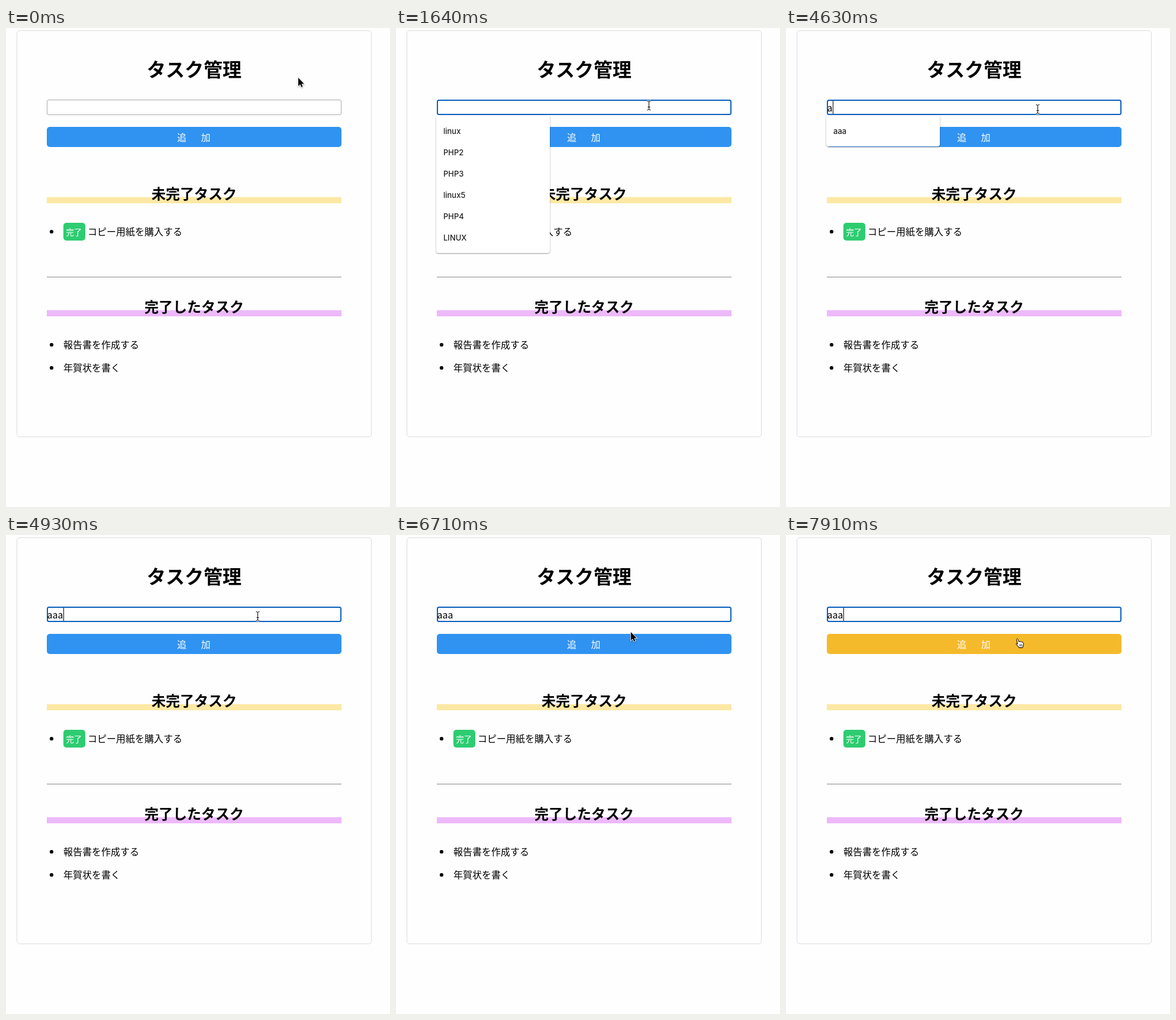
Write an HTML page that moves like this. It is 649 px wide and 809 px high and loops after 8000 ms.

```html
<!DOCTYPE html>
<html lang="ja">
<head>
<meta charset="utf-8">
<title>タスク管理</title>
<style>
  html, body { margin: 0; width: 100%; height: 100%; overflow: hidden; background: #fefefe; }
  svg { display: block; width: 649px; height: 809px; font: 16px "Noto Sans CJK JP", "Noto Sans CJK", sans-serif; }
  .title, .heading { font-weight: 700; text-anchor: middle; }
  .title { font-size: 32px; }
  .heading { font-size: 24px; }
  .done { font-size: 13.33px; }
  .light { fill: #fff; }
  .option { font: 500 13px Inter, sans-serif; fill: #222; }
  #panel { filter: drop-shadow(0 1px 1.2px rgba(0, 0, 0, .4)); }
</style>
</head>
<body>
<svg viewBox="0 0 649 809">
  <rect x="18.5" y="4.5" width="599" height="686" rx="4.5" fill="none" stroke="#ddd"/>
  <text class="title" x="318" y="82">タスク管理</text>

  <rect id="field" fill="#fff"/>
  <text id="typed" x="69.5" y="141"></text>
  <rect id="caret" y="123" width="1" height="22"/>

  <rect id="button" x="69" y="167" width="498" height="34" rx="5"/>
  <text class="light" x="289" y="191">追</text>
  <text class="light" x="329.5" y="191">加</text>

  <rect x="69" y="285.6" width="498" height="10.4" fill="#fde8a4"/>
  <text class="heading" x="318" y="289">未完了タスク</text>
  <circle cx="77" cy="344" r="3.1"/>
  <rect x="97" y="329" width="37" height="30" rx="5" fill="#2ecc71"/>
  <text class="done light" x="101.5" y="349.5">完了</text>
  <text x="138" y="350">コピー用紙を購入する</text>

  <path d="M69 420.5H567" stroke="#9a9a9a"/>
  <path d="M69 421.5H567" stroke="#e6e6e6"/>

  <rect x="69" y="476.6" width="498" height="10.4" fill="#edb9fa"/>
  <text class="heading" x="318" y="480">完了したタスク</text>
  <circle cx="77" cy="535" r="3.1"/>
  <text x="97" y="541">報告書を作成する</text>
  <circle cx="77" cy="574" r="3.1"/>
  <text x="97" y="580">年賀状を書く</text>

  <g id="menu">
    <path id="panel" fill="#fff"/>
    <g id="options"></g>
  </g>

  <g id="arrow" filter="drop-shadow(0 1px 1px rgba(0,0,0,.35))">
    <path d="M0 0V14L3.2 11 5.3 15.8 7.5 14.9 5.4 10.2H9.8Z" stroke="#fff" stroke-width="1.6" paint-order="stroke"/>
  </g>
  <g id="beam" fill="none">
    <path id="beamShape" d="M-3-7.5Q0-7.5 0-6Q0-7.5 3-7.5M0-6V6M-3 7.5Q0 7.5 0 6Q0 7.5 3 7.5M-2 2.5H2" stroke="#fff" stroke-width="2.4"/>
    <use href="#beamShape" style="stroke:#000"/>
    <path d="M-3-7.5Q0-7.5 0-6Q0-7.5 3-7.5M0-6V6M-3 7.5Q0 7.5 0 6Q0 7.5 3 7.5M-2 2.5H2" stroke="#000"/>
  </g>
  <g id="hand" stroke="#000" stroke-linejoin="round" filter="drop-shadow(0 1px .6px rgba(0,0,0,.3))">
    <path fill="#fff" d="M2.6 9.8L.7 2.6C.2.6 2.6 0 3.2 1.9L4.6 6C4.8 4.7 7 4.8 7.2 6.2C7.8 5.1 9.6 5.4 9.8 6.8C10.6 6 12.4 6.6 12.4 8.4C12.4 11 12 12.5 10.8 15.5H4.8C4 13.5 2 12.5.2 10C-.6 8.6.8 8 2.6 9.8Z"/>
    <path fill="none" stroke-width=".8" d="M5.8 10.2L6.2 13M7.7 10V13M9.6 10L9.3 13"/>
  </g>
</svg>
<script>
const LOOP = 8000;
const $ = id => document.getElementById(id);
const history = ["linux", "PHP2", "PHP3", "linux5", "PHP4", "LINUX"];

// Each track lists [start time, value]; values hold until the next entry.
const pointer = [
  [0, ["arrow", 494, 84]], [900, ["arrow", 466, 97]],
  [1040, ["beam", 429.5, 129.5]], [1190, ["beam", 428.5, 131]], [1340, ["beam", 427.5, 131]],
  [2840, ["beam", 426.5, 136]], [2980, ["beam", 425.5, 137]], [6560, ["beam", 422.5, 137]],
  [6710, ["arrow", 397, 164]], [6860, ["hand", 389.5, 175.5]], [7010, ["hand", 389, 174.5]]
];
const focus = [[0, false], [1640, true]];
const typing = [[0, ""], [4630, "a"], [4780, "aa"], [4930, "aaa"]];
const suggestions = [[0, []], [1640, history], [4630, ["aaa"]], [4930, []]];
const caretOn = [[0, false], [4630, true], [5370, false], [5970, true], [6420, false],
                 [6860, true], [7460, false], [7910, true]];
const hover = [[0, false], [6860, true]];

const at = (track, t) => track.findLast(([start]) => start <= t)[1];

function setAttributes(id, attributes) {
  for (const [name, value] of Object.entries(attributes)) $(id).setAttribute(name, value);
}

function show(id, visible) {
  $(id).style.display = visible ? "" : "none";
}

function drawField(focused) {
  const line = focused ? 2 : 1;
  setAttributes("field", {
    x: 69 + line / 2, y: 121 + line / 2, width: 498 - line, height: 26 - line,
    rx: 2.5, stroke: focused ? "#0a5fbd" : "#a9a9a9", "stroke-width": line
  });
}

function drawMenu(items) {
  show("menu", items.length > 0);
  const bottom = 164 + 36 * items.length;
  setAttributes("panel", { d: `M68 149H260V${bottom - 4}q0 4-4 4H72q-4 0-4-4Z` });
  $("options").innerHTML = items
    .map((item, i) => `<text class="option" x="80" y="${179 + 36 * i}">${item}</text>`).join("");
}

function drawPointer([kind, x, y]) {
  for (const id of ["arrow", "beam", "hand"]) show(id, id === kind);
  setAttributes(kind, { transform: `translate(${x} ${y})` });
}

let shownItems;
function render(t) {
  const text = at(typing, t), items = at(suggestions, t);
  drawField(at(focus, t));
  $("typed").textContent = text;
  setAttributes("caret", { x: 70 + 9 * text.length });
  show("caret", at(caretOn, t));
  setAttributes("button", { fill: at(hover, t) ? "#f5ba2b" : "#3093f1" });
  if (items !== shownItems) drawMenu(shownItems = items);
  drawPointer(at(pointer, t));
}

const begin = performance.now();
function tick() {
  render((performance.now() - begin) % LOOP);
  requestAnimationFrame(tick);
}
tick();
</script>
</body>
</html>
```
